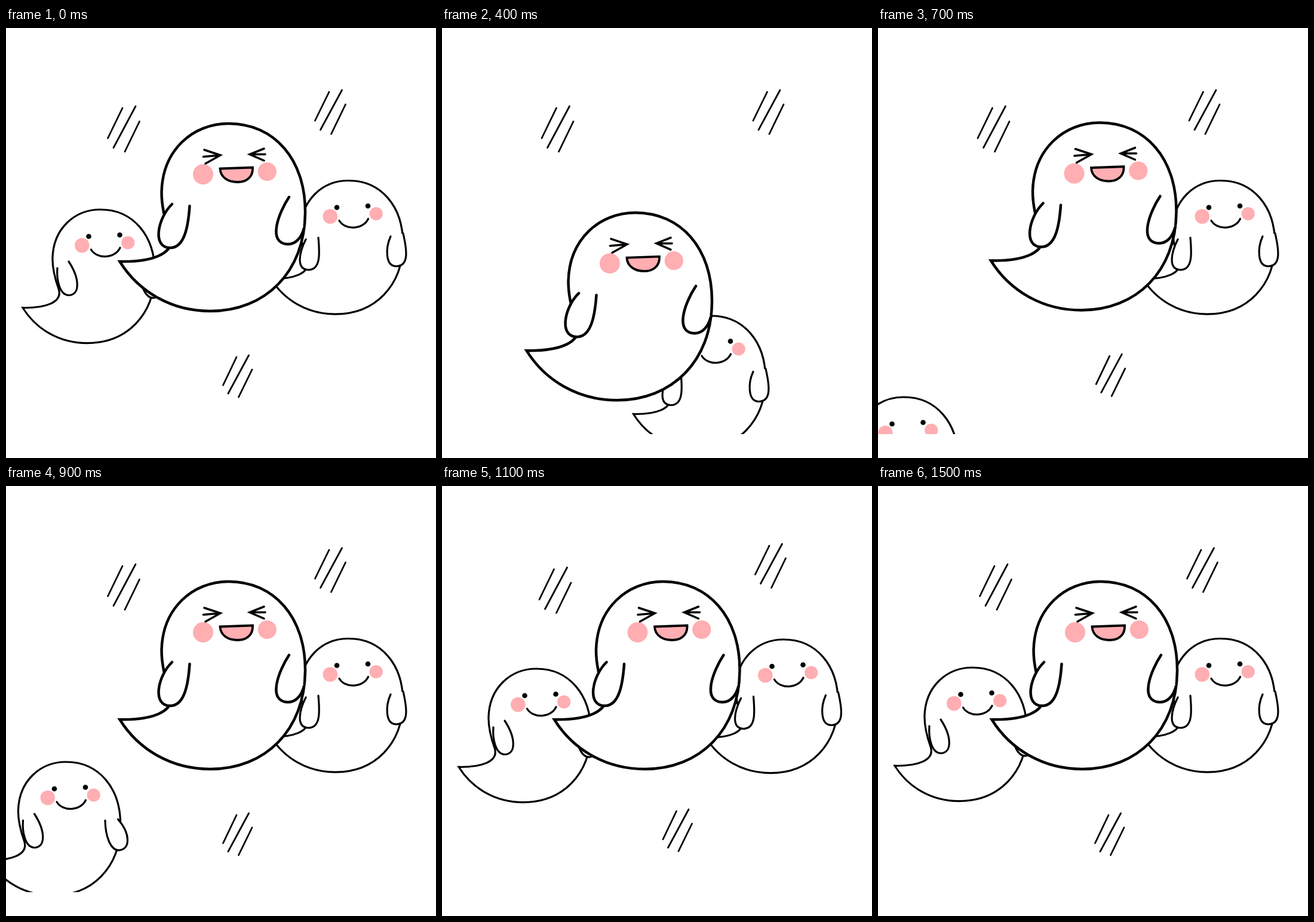
An HTML page that plays this animation: 720x720 px, repeating every 1.6 s.

```html
<!DOCTYPE html>
<html lang="en">
<head>
<meta charset="utf-8">
<title>Happy ghosts</title>
<style>
  html, body { margin: 0; width: 100%; height: 100%; overflow: hidden; background: #fff; }
  svg { display: block; width: 100vw; height: 100vh; }
  .ink { fill: none; stroke: #000; stroke-linecap: round; }
  .skin { fill: #fff; }
  .pink { fill: #ffaeb2; }
  .big { stroke-width: 4.5; }
  .small { stroke-width: 3.2; }
</style>
</head>
<body>
<svg viewBox="0 0 720 720">
  <defs>
    <clipPath id="stage"><rect width="720" height="680"/></clipPath>
    <path id="body" class="ink skin big" stroke-miterlimit="4" d="M275 347C266 322 260.5 300 260.5 275C262 205 312 160 373 160C449 160 502 220 501 310C500 408 435 474 342 474C275 474 221 440 190.5 391C240 392 285 380 275 347Z"/>
    <g id="kid">
      <use href="#body" transform="translate(158 304) scale(.712) translate(-373 -160)"/>
      <g class="pink">
        <circle cx="127.3" cy="364" r="12.3"/>
        <circle cx="204.2" cy="359.5" r="11.1"/>
      </g>
      <circle cx="138.5" cy="349" r="4.3"/>
      <circle cx="190.5" cy="346.5" r="4.3"/>
      <path class="ink small" d="M142.5 371C152 387 182 387 191 368"/>
    </g>
  </defs>

  <g clip-path="url(#stage)">
    <g class="ink" stroke-width="2.8">
      <path id="dashL" d="M195 134L170.5 184.5M217 131L180 200.5M223.5 156.5L199 207"/>
      <path id="dashR" d="M541 107L517.5 155M562.5 104L526.5 170.5M568.5 128L544.5 177.5"/>
      <path id="dashB" d="M386 551L363.5 598M406.5 548L372 612M412 572L389.5 618"/>
    </g>

    <g id="left">
      <use href="#kid"/>
      <g class="ink skin small">
        <path d="M86 402C84.5 420 89 447 105 447.5C124 447 124 420 105 391"/>
        <path d="M223.5 402C224 428 232 452 247 452C266 450 266 424 245 400"/>
      </g>
    </g>

    <g id="right">
      <g transform="translate(415.5 -48.5)">
        <use href="#kid"/>
        <g class="ink skin small">
          <path d="M86.5 402.5C75 425 70 453 91 453.5C111 453 110 428 107.5 399.5"/>
          <path d="M228.5 397.5C220 416 219 447.5 238 447.5C258 447 257 425 249.5 392.5"/>
        </g>
      </g>
    </g>

    <g id="main">
      <use href="#body"/>
      <g class="ink skin big">
        <path d="M278 295C254 318 244 368 275 368C298 368 305 335 307.5 298"/>
        <path d="M474 283C456 310 437 361 472 362C486 362 495 350 499 335"/>
      </g>
      <g class="pink">
        <circle cx="330" cy="245" r="17"/>
        <circle cx="437.3" cy="240.5" r="15.6"/>
      </g>
      <path class="ink" stroke-width="3.5" d="M332 204L359 213L334 227M330.5 215.5L359 213M432 202L408 211.5L432 222M434 211.5H408"/>
      <path class="pink" stroke="#000" stroke-width="3.8" d="M358.5 235.5L413 233.5C414 250 402 258 388 258C372 258 359 250 358.5 235.5Z"/>
    </g>
  </g>
</svg>

<script>
const STEP = 100, STEPS = 16;

// Wobble offsets, one per beat of a three-beat cycle
const dashes = {
  dashL: [[0, 0], [-3.5, 0], [-7.5, 5.5]],
  dashR: [[0, 0], [3.5, 0], [7, -7]],
  dashB: [[0, 0], [1.7, -1.7], [6.5, -6.5]]
};

// Each ghost flies in between two steps, then wobbles
const ghosts = {
  main: { start: 2, end: 5, from: [-144, 443.5], to: [-1.5, 2], wobble: [[0, 0], [-1.5, -1.5], [-2.5, 0]] },
  right: { start: 3, end: 7, from: [-164, 302], to: [0, 0], wobble: [[0, 0], [3, 1.5], [-1.5, 1.5]] },
  left: { start: 7, end: 11, from: [-115, 314], to: [0, 2], wobble: [[0, 0], [0, 0], [0, 2]] }
};

const el = id => document.getElementById(id);
const move = (id, [x, y]) => el(id).setAttribute("transform", `translate(${x} ${y})`);

function ghostAt(g, step) {
  if (step < 2) return [0, 0];
  if (step > g.end) return g.wobble[step % 3];
  const p = (step - g.start) / (g.end - g.start);
  return g.from.map((a, i) => a + (g.to[i] - a) * p);
}

function draw(time) {
  const step = Math.floor(time / STEP) % STEPS;
  const beat = step < 2 ? 0 : step % 3;
  for (const id in dashes) move(id, dashes[id][beat]);
  for (const id in ghosts) {
    const g = ghosts[id];
    const shown = step < 2 || step >= g.start;
    el(id).setAttribute("visibility", shown ? "visible" : "hidden");
    move(id, ghostAt(g, step));
  }
}

function tick(now) {
  draw(now);
  requestAnimationFrame(tick);
}
draw(0);
requestAnimationFrame(tick);
</script>
</body>
</html>
```
